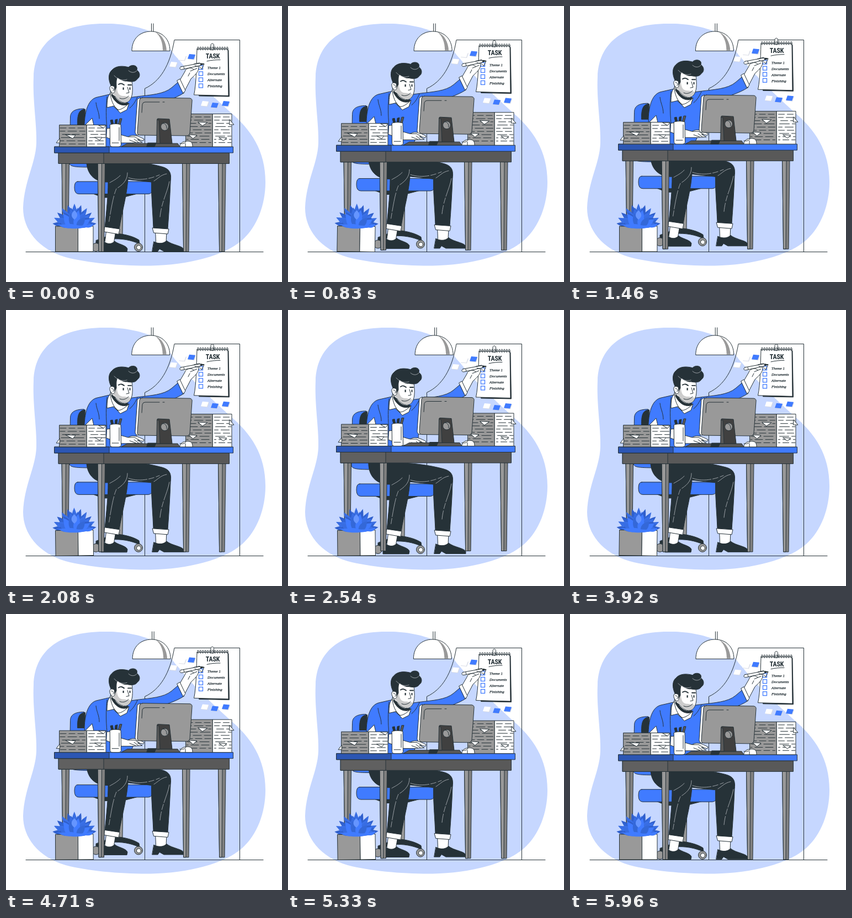
Recreate the animation shown at these times as an HTML page. Size 500 by 500 pixels, loop 6000 ms.

```html
<!DOCTYPE html>
<html lang="en">
<head>
<meta charset="utf-8">
<title>Working through the task list</title>
<style>
html, body { margin: 0; width: 100%; height: 100%; overflow: hidden; background: #fff; }
svg { display: block; width: 100vw; height: 100vh; }
.ink { stroke: #263238; stroke-width: 1; stroke-linejoin: round; stroke-linecap: round; }
.line { fill: none; }
.white { fill: #fff; }
.blue { fill: #407bff; }
.navy { fill: #2c56b3; }
.gray { fill: #999; }
.mid { fill: #808080; }
.slate { fill: #595959; }
.dark { fill: #263238; }
.fold { fill: none; stroke: #b8bcc0; stroke-width: .8; stroke-linecap: round; }
.title { font: bold 12px "Noto Sans ExtraCondensed", "Roboto Condensed", Roboto, sans-serif; font-stretch: 62.5%; letter-spacing: -.2px; text-anchor: middle; fill: #263238; }
.note { font: italic 7px "Liberation Serif", serif; fill: #263238; stroke: #263238; stroke-width: .25; }
</style>
</head>
<body>
<svg viewBox="0 0 500 500">
  <path fill="#c6d7ff" d="M178 32C211 31 243 38 264 47C288 58 294 77 312 96C338 129 371 160 406 192C444 224 470 262 470 319C470 360 455 400 428 424C395 453 330 469 262 470.500C210 471 150 466 108 455C58 440 31 405 31 366C33 316 54 285 55 248C56 214 48 170 50 128C52 70 92 32 178 32Z"/>
  <path class="ink line" d="M36 445.500H466"/>
  <path class="ink line" d="M251.500 445V149.500C279 137 297 108 305 61.500H423.500V445"/>

  <g id="lamp" class="ink">
    <path class="white" stroke="none" d="M263 32H267V47H263Z"/>
    <path class="line" d="M263.500 32V47M267 32V47"/>
    <path class="white" stroke="none" d="M228 81C228 59 243 46 262.500 46S297 59 297 81Z"/>
    <path class="gray" stroke="none" d="M271 47.500C283 52 290 65 291 80.500H284C284 66 280 55 271 47.500Z"/>
    <path class="line" d="M228 81C228 59 243 46 262.500 46S297 59 297 81Z"/>
  </g>

  <g id="wall">
    <g id="stickers"></g>
    <path class="ink dark" d="M352 79L403 80L404.500 164L350 163Z"/>
    <path class="ink white" d="M346 78H402L403 162.500L340.500 161C345 140 345 105 346 78Z"/>
    <path class="ink white" d="M371 79V71C371 67 376.500 67 376.500 71V79Z"/>
    <g id="rings" class="ink line"></g>
    <text class="title" x="374.500" y="95">TASK</text>
    <path class="ink line" d="M364 100C372 98 380 97.500 388 97.500"/>
    <g id="tasks"></g>
    <path class="ink line" d="M352 111L354.500 114.500L359 105"/>
  </g>

  <g id="person">
    <g class="ink">
      <path class="blue" d="M141 186C125 186 116.500 191 116.500 202L115 285C116 291 125 292 152 292Z"/>
      <path class="dark" d="M143 187C133 188 129 194 129.500 215H146Z"/>
      <path class="dark" d="M158 340H238L211 347H176Z"/>
      <path class="gray" d="M201 340H212L211 414H202Z"/>
      <path class="dark" d="M198 412C216 413 232 418 241 424L242 431C226 424 210 421 190 422L163 431V425Z"/>
      <circle class="gray" cx="240" cy="437" r="7.500"/>
      <circle class="white" cx="240.500" cy="437.500" r="4"/>
      <circle class="gray" cx="163" cy="437" r="7.500"/>
      <path class="blue" d="M130 318H260Q266 318 266 329T258 340.500H132Q124 340.500 124 329T130 318Z"/>
    </g>

    <g class="ink">
      <path class="white" d="M182 407H199L195 431H179Z"/>
      <path class="white" d="M271 407H291L290 430H272Z"/>
      <path class="dark" d="M179 428C187 433 193 430 197 426C201 431 218 433 220 440L219 445H172V430Z"/>
      <path class="dark" d="M268 427C278 432 286 430 291 425C300 433 320 434 322 441V444.500H286L278 440L275 444.500H265Z"/>
      <path class="dark" d="M186 280C225 279 260 285 282 291C297 295 300 303 298 318C297 346 295 377 293 404L267 402C266 374 263 345 263.500 319L218 314Z"/>
      <path class="dark" d="M146 276H190C210 279 222 286 221.500 302C221 339 210 371 205 405L179 402C182 371 185 344 185 319C160 320 144 303 146 276Z"/>
      <path class="white" d="M179 400L206 404L204 413.500L178 409Z"/>
      <path class="white" d="M265.500 402L295 404L293 413L268 411Z"/>
    </g>
    <path class="fold" d="M220 302C220 315 213 323 200 331C194 344 190 370 186 394M188 320C193 317 200 314 207 307M222 311C240 317 259 314 278 306M296 318C292 339 282 354 279 382M291 304C280 306 275 313 268 317" stroke-dasharray="34 3 10 4"/>

    <g class="ink">
      <path class="blue" d="M145 278L142 214C143 190 149 168 166 165L188 160L215 167L238 164C261 161 286 160 300 148L313 137L323 157C307 168 283 174 258 183L238 192L236 236L216 279Z"/>
      <path class="line" d="M163 175C164 186 169 192 169 204M183 164C181 185 181 200 183 222M238 165C234 174 230 180 224 185"/>
      <path class="white" d="M183 222L192 221V242L182 238Z"/>
      <path class="white" d="M190 228L221 237C231 231 240 236 250 241L249 244L238 242L247 247L229 248L190 248Z"/>
      <path class="line" d="M222 237L233 237L242 242M232 241L240 247M224 243L235 247"/>
    </g>

    <g class="ink">
      <path class="white" d="M191 151L216 172L222 181L205 191L185 173Z"/>
      <path class="dark" d="M193 157C199 171 209 179 221 175L221 178.500C207 183 197 174 191 162Z"/>
      <path class="white" d="M189 159C184 162 183 171 183 184L196 181L207 194L219 188L223 176C216 183 209 188 203 188C194 182 190 169 189 159Z"/>
      <path class="white" d="M195 128L228 136C230 151 230 165 223 172C215 179 205 173 198 164C186 159 186 140 195 142Z"/>
      <path fill="#ccc" stroke="none" d="M194.500 148L201 147C201 158 206 164 214 163L226 165C225 169 223 171 221 173C212 178 203 169 198 163L192 158Z"/>
      <path class="dark" d="M195 154L190 144C185 133 185 122 192 116C199 108 212 108 222 111C227 105 240 107 237 116C244 121 243 129 238 132C234 139 224 137 219 136C213 137 205 132 202 129C199 134 200 141 200 147L197 153Z"/>
      <path class="white" d="M196 146C188 141 185 149 191 156C193 159 196 158 197 155Z"/>
      <path class="line" d="M191 148C194 148 196 151 194 154M220 147L223 157L218 158M206 167C212 170 219 167 222 163"/>
      <path class="line" stroke-width="1.900" d="M204 142C208 139 211 141 214 143M221 143L227 143"/>
      <path class="dark" stroke="none" d="M211.500 147.500h2.200v4.200h-2.200zM223.500 147.500h2v4.200h-2z"/>
      <path class="fold" d="M196 126C202 133 211 136 219 133M222 117C227 122 234 121 237 117"/>
    </g>

    <g class="ink">
      <path class="white" d="M314 136L324 119C326 112 334 109 341 105L351 103L349 113C348 121 340 127 335 132L324 153Z"/>
      <path class="white" d="M310 135L315 132L325 153L321 158Z"/>
      <path class="white" d="M317 110L350 104L358 105L351 108L319 115C314 116 314 111 317 110Z"/>
      <path class="dark" d="M353 104L359 105L353 107Z"/>
      <path class="line" d="M322 110L323 114M328 114C333 111 337 112 340 115M334 118L346 113M330 127L333 121M342 108L348 110"/>
    </g>
  </g>

  <g id="desk">
    <g id="legs" class="ink"></g>
    <g class="ink">
      <path class="slate" d="M95.500 266H404.500V285.500H95.500Z"/>
      <path fill="#606060" d="M95.500 266H177V285.500H95.500Z"/>
      <path class="blue" d="M88 255H411.500V266H88Z"/>
      <path class="navy" d="M88 255H187V266H88Z"/>
    </g>
    <g id="papers" class="ink"></g>

    <g class="ink">
      <path class="dark" d="M191 215L189 207L193 206L195 215ZM197 215L198 206L202 205L201 215Z"/>
      <path class="slate" d="M203 215L206 204L210 204L207 215Z"/>
      <path class="white" d="M188.500 215C194 213 203 213 208 215L208.500 252Q208 255 204 255H193Q188.500 255 188.500 251Z"/>
      <path class="line" d="M205 220V244M192 248H204"/>
    </g>

    <g class="ink">
      <path class="slate" d="M220 249H311L315 255H209Z"/>
      <path class="dark" d="M257 248H272L269 255H255Z"/>
      <path class="white" d="M243 166L238 169L234 228Q234 233 239 234Z"/>
      <path class="gray" d="M247 166L333 167Q338 168 337 173L333 230Q332 235 327 235L242 234Q237 233 238 228L242 170Q243 166 247 166Z"/>
      <path class="line" d="M246 193L247 178Q248 174 252 174L278 174M284 174L287 174"/>
      <path fill="#404040" d="M274 206Q273 204 276 204L296 205L301 249H274Z"/>
      <path class="slate" d="M274 206L277 207L279 249H273Z"/>
      <circle class="gray" cx="287.500" cy="218.500" r="7"/>
      <path class="line" d="M283 213C287 211 292 216 291 222"/>
      <path class="white" d="M315 254C315 246 325 244 332 245C337 246 338 250 338 255H315Z"/>
      <path class="line" d="M315 249C320 250 325 249 326 245M325 249V255"/>
    </g>
  </g>

  <g id="plant">
    <g id="leaves"></g>
    <path class="ink gray" d="M89.500 399H130.500V445H89.500Z"/>
    <path class="ink white" d="M130.500 399H158V445H130.500Z"/>
    <g id="petals"></g>
  </g>
</svg>
<script>
const LOOP = 6000;
const $ = id => document.getElementById(id);
const range = n => Array.from({ length: n }, (_, i) => i);
const path = (cls, d, extra = "") => `<path class="${cls}" d="${d}" ${extra}/>`;

function sticker([x, y, cls]) {
  const shape = "l11 1l-3 8.5l-11 -1z";
  return path("", `M${x + 1} ${y + 1}${shape}`, 'fill="#d6dae5"') + path(cls, `M${x} ${y}${shape}`);
}

function deskLeg(x) {
  return path("mid", `M${x} 285H${x + 13}L${x + 11} 445H${x + 2}Z`) +
    path("gray", `M${x} 285H${x + 7}L${x + 6} 445H${x + 2}Z`);
}

function stack(x, top, split, right) {
  const rows = Math.floor((253 - top) / 5.8);
  const lines = range(rows).map(i => {
    const y = top + 5.5 + i * 5.8;
    const dash = `stroke-dasharray="${11 + i * 5 % 8} 5" stroke-dashoffset="${i * 7}"`;
    return path("line", `M${x + 1} ${y}H${split - 3}M${split + 3} ${y}H${right - 1}`, dash);
  });
  return path("gray", `M${x} ${top}H${split}V255H${x}Z`) +
    path("white", `M${split} ${top}H${right}V255H${split}Z`) + lines.join("");
}

function leaf(x, y, angle, length, width, color) {
  const d = `M0 0C${-width} ${-length * .35} ${-width * .7} ${-length * .7} 0 ${-length}` +
    `C${width * .7} ${-length * .7} ${width} ${-length * .35} 0 0Z`;
  return `<path fill="${color}" d="${d}" transform="translate(${x} ${y}) rotate(${angle})"/>`;
}

const fan = (n, spread, y, length, width, colors) => range(n).map(i => {
  const u = i / (n - 1) * 2 - 1;
  return leaf(124 + u * 4, y, u * spread, length - Math.abs(u) * 5, width, colors[i % colors.length]);
}).join("");

$("stickers").innerHTML = [
  [299, 101, "white"], [315, 89, "white"], [332, 87, "blue"],
  [356, 172, "white"], [374, 175, "blue"], [394, 172, "blue"]
].map(sticker).join("");

$("rings").innerHTML = range(13).map(i => {
  const x = 348 + i * 4.4;
  return path("line", `M${x} 80C${x - 3} 74 ${x + 1} 71 ${x + 1.5} 78`);
}).join("");

$("tasks").innerHTML = ["Theme 1", "Documents", "Alternate", "Finishing"].map((label, i) => {
  const y = 108 + i * 11;
  return `<rect x="349.5" y="${y}" width="7" height="7" fill="#fff" stroke="#407bff" stroke-width="1.3"/>` +
    `<text class="note" x="365" y="${y + 6.5}">${label}</text>`;
}).join("");

$("legs").innerHTML = [101.5, 166.5, 320, 385].map(deskLeg).join("");

$("papers").innerHTML =
  path("white", "M143 216L156 203L159 216Z") +
  stack(97, 215.5, 146.5, 181) + stack(326, 195.5, 374.5, 409) +
  [
    "M97 240L91 248H97Z", "M108 233L126 234L121 240Z", "M161 238L174 238L170 243Z",
    "M168 216L181 216L177 221Z", "M348 210L365 211L356 217Z", "M331 233L346 234L339 240Z",
    "M386 238L400 239L394 244Z", "M405 206L413 215H405Z"
  ].map(d => path("white", d)).join("");

$("leaves").innerHTML =
  fan(11, 82, 399, 41, 8, ["#2f5fcc", "#386de2"]) +
  fan(8, 68, 400, 36, 9, ["#3a70e8", "#3164d3"]);
$("petals").innerHTML =
  fan(8, 84, 398, 32, 8, ["#2f5fcc", "#3a70e8"]) +
  fan(6, 60, 401, 33, 9, ["#386de2", "#407bff"]) +
  fan(4, 38, 402, 29, 9, ["#407bff", "#3468d8"]) +
  leaf(124, 387, 0, 17, 8, "#6595ff") +
  path("blue", "M91 395C106 398 116 393 124 396S148 398 158 394C157 402 149 402 144 401C134 404 112 404 104 401Z");

// Linear interpolation through [progress, value] stops.
function tween(stops, p) {
  const i = Math.max(1, stops.findIndex(([at]) => at >= p));
  const [p0, v0] = stops[i - 1], [p1, v1] = stops[i];
  return v0 + (v1 - v0) * (p - p0) / (p1 - p0);
}

const FLOAT = [[0, 0], [.5, -10], [1, 0]];
const SWAY = [[0, 0], [.25, 1], [.75, -1], [1, 0]];
const SHAKE = [[0, 0], [.1, -1], [.2, 2], [.3, -4], [.4, 4], [.5, -4], [.6, 4], [.7, -4], [.8, 2], [.9, -1], [1, 0]];

const start = performance.now();
function draw(now) {
  const t = Math.max(0, now - start) % LOOP;
  const slow = t / LOOP, fast = t % 3000 / 3000;
  const rise = `translate(0 ${tween(FLOAT, fast)})`;
  $("person").setAttribute("transform", rise);
  $("wall").setAttribute("transform", rise);
  $("desk").setAttribute("transform", `translate(0 ${tween(FLOAT, slow)})`);
  $("lamp").setAttribute("transform", `translate(${tween(SHAKE, slow)} 0)`);
  $("plant").setAttribute("transform", `rotate(${tween(SWAY, fast)} 124 402)`);
  requestAnimationFrame(draw);
}
draw(start);
</script>
</body>
</html>
```
